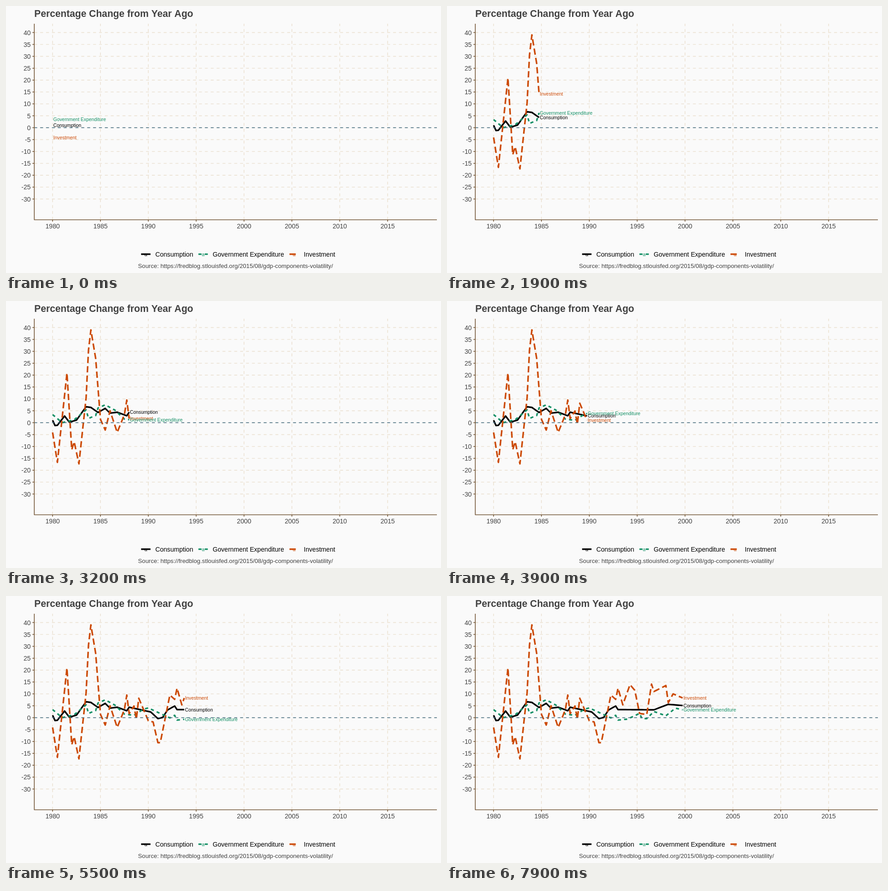
Recreate the animation shown at these times as an HTML page with a canvas. Size 954 by 587 pixels, loop 8000 ms.

```html
<!DOCTYPE html>
<html lang="en">
<head>
<meta charset="utf-8">
<title>Percentage Change from Year Ago</title>
<style>
html, body { margin: 0; width: 100%; height: 100%; overflow: hidden; background: #fafafa; }
canvas { display: block; }
</style>
</head>
<body>
<canvas id="stage" width="954" height="587"></canvas>
<script>
const ctx = document.getElementById('stage').getContext('2d');
const STEP = 100, QUARTERS = 80;
const LEFT = 62, RIGHT = 945, TOP = 39, BOTTOM = 470;
const FONT = '"Liberation Sans", Arial, sans-serif';
const LINE = 3.45, THIN = 1.61, DASH = [6.45, 6.45];
const BROWN = '#76593a', GREY = '#424242', GRID = '#ece2d3';

const xAt = quarter => 102.2 + quarter * 5.248;
const yAt = value => 267.5 - value * 5.229;

// Turning points as [quarter since 1980, percent], joined by straight lines
const consumption = {
  name: 'Consumption', color: '#000', dash: [], key: 296.3, label: 327.5,
  turns: [[0, 1], [1, -1.2], [2, -1.1], [5, 2.8], [7, .2], [10, 1.1], [14, 6.7],
    [16, 6.4], [19, 4.3], [22, 6], [24, 4], [27, 4.4], [31, 2.9], [32, 4.4], [41, 2.4],
    [44, -.4], [46, .1], [48, 3.2], [51, 4.9], [52, 3.4], [67, 3.3], [73, 5.6], [79, 5.1]]
};
const government = {
  name: 'Government Expenditure', color: '#159066', dash: [2, 2], key: 422, label: 453.2,
  turns: [[0, 3.4], [4, 0], [9, 1.2], [14, 5.4], [15, 1.8], [18, 3], [19, 6.2], [22, 7.5],
    [26, 5.3], [30, 1.5], [34, 1], [38, 3.6], [40, 4.1], [46, 1.3], [49, -.1], [51, 1],
    [52, -1], [56, -.6], [61, 1.8], [62, -.4], [64, -.4], [67, 2.6], [72, .8], [76, 4], [79, 3.3]]
};
const investment = {
  name: 'Investment', color: '#cc4a06', dash: [4, 2], key: 621.7, label: 653,
  turns: [[0, -4.1], [2, -16.7], [6, 20.9], [8, -11.4], [9, -8], [11, -17.3], [14, 10.5],
    [15, 30.5], [16, 39], [18, 27], [20, 1.4], [22, -3.1], [24, 5], [27, -4.1], [30, 3.4],
    [31, 9.5], [32, 1.7], [34, 4.9], [35, -.6], [36, 8.2], [40, -1.3], [42, -1.8],
    [44, -10.5], [45, -10.5], [49, 9.5], [51, 7.7], [52, 12.4], [54, 5.4], [57, 13.9],
    [59, 11.5], [61, 1.8], [64, 1.3], [66, 14.1], [67, 11], [72, 13.5], [73, 6.3], [75, 10], [79, 8.3]]
};
const series = [consumption, government, investment];

function valueAt({ turns }, quarter) {
  const next = Math.max(1, turns.findIndex(([q]) => q >= quarter));
  const [q0, v0] = turns[next - 1], [q1, v1] = turns[next];
  return v0 + (v1 - v0) * (quarter - q0) / (q1 - q0);
}

function stroke(points, color, width, dash = []) {
  ctx.strokeStyle = color;
  ctx.lineWidth = width;
  ctx.lineJoin = 'round';
  ctx.setLineDash(dash);
  ctx.beginPath();
  points.forEach(([x, y]) => ctx.lineTo(x, y));
  ctx.stroke();
}

function text(str, x, y, size, color, align = 'left', weight = '') {
  ctx.font = `${weight} ${size}px ${FONT}`;
  ctx.fillStyle = color;
  ctx.textAlign = align;
  ctx.fillText(str, x, y);
}

const strokeSeries = (s, points) => stroke(points, s.color, LINE, s.dash.map(d => d * LINE));

function drawGrid() {
  for (let v = -30; v <= 40; v += 5) {
    const y = yAt(v);
    stroke([[LEFT, y], [RIGHT, y]], GRID, THIN, DASH);
    stroke([[LEFT - 4, y], [LEFT, y]], BROWN, THIN);
    text(v, 54.2, y + 5.2, 14.2, GREY, 'right');
  }
  for (let year = 1980; year <= 2015; year += 5) {
    const x = xAt((year - 1980) * 4);
    stroke([[x, BOTTOM], [x, TOP]], GRID, THIN, DASH);
    stroke([[x, BOTTOM], [x, BOTTOM + 4]], BROWN, THIN);
    text(year, x, 489, 14.2, GREY, 'center');
  }
}

function drawLegend() {
  for (const s of series) {
    strokeSeries(s, [[s.key, 545.6], [s.key + 20.6, 545.6]]);
    text('a', s.key + 10.3, 549.6, 10.4, s.color, 'center');
    text(s.name, s.label, 551, 14.1, '#000');
  }
}

function draw(last) {
  ctx.fillStyle = '#fafafa';
  ctx.fillRect(0, 0, 954, 587);
  text('Percentage Change from Year Ago', 62, 24, 21.2, GREY, 'left', 'bold');
  drawGrid();
  for (const s of series)
    strokeSeries(s, Array.from({ length: last + 1 }, (_, i) => [xAt(i), yAt(valueAt(s, i))]));
  for (const s of [investment, consumption, government])
    text(s.name, xAt(last) + 1.6, yAt(valueAt(s, last)) + 3.7, 10.4, s.color);
  stroke([[LEFT, yAt(0)], [RIGHT, yAt(0)]], '#3f677c', THIN, DASH);
  stroke([[LEFT, TOP], [LEFT, BOTTOM], [RIGHT, BOTTOM]], BROWN, THIN);
  drawLegend();
  text('Source: https://fredblog.stlouisfed.org/2015/08/gdp-components-volatility/',
    289.5, 576.4, 13.22, GREY);
}

const start = performance.now();
function tick() {
  draw(Math.floor(Math.max(0, performance.now() - start) / STEP) % QUARTERS);
  requestAnimationFrame(tick);
}
tick();
</script>
</body>
</html>
```
